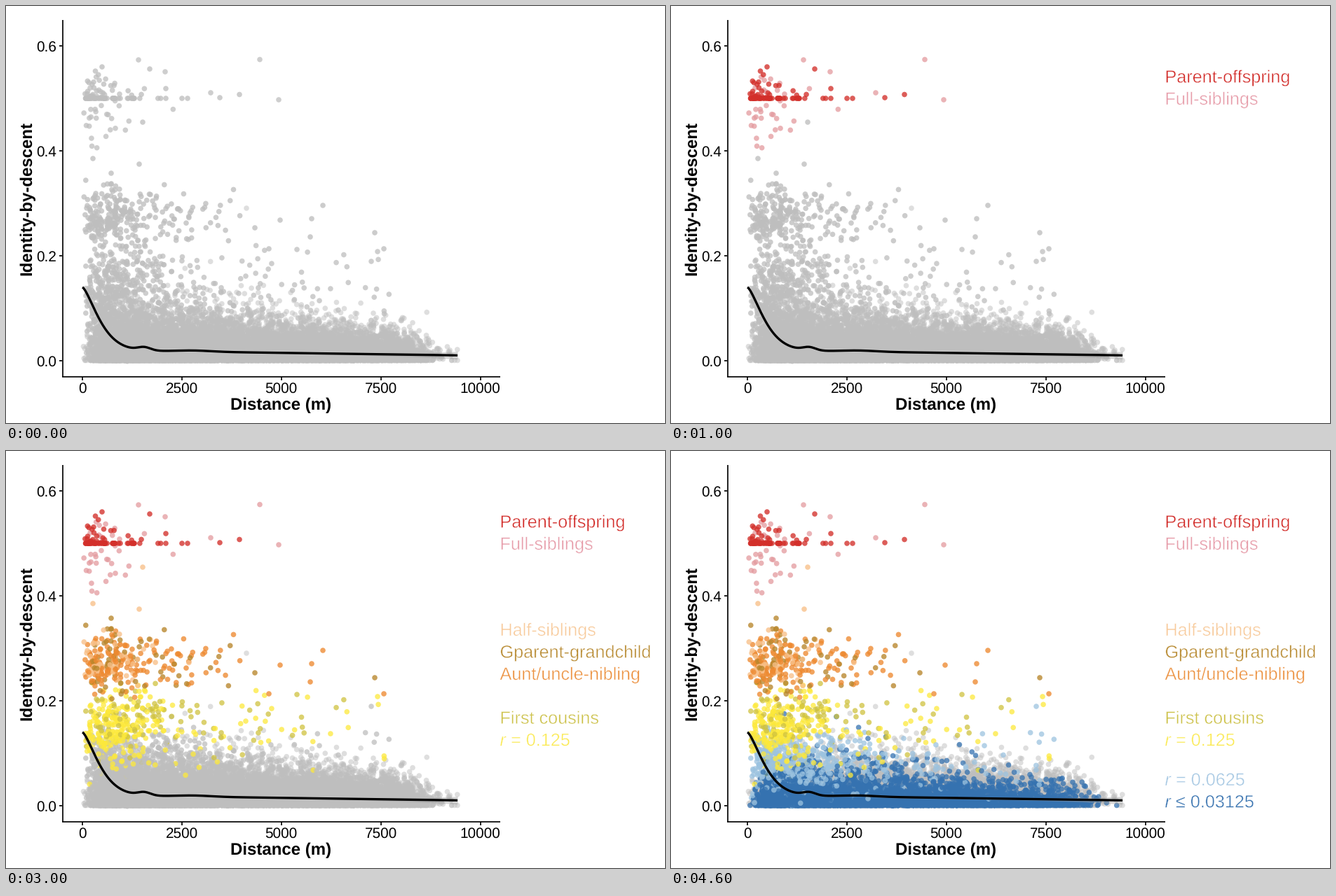
A matplotlib script that plays this animation: 940x596 px, repeating every 5 s.

```python
import numpy as np
import matplotlib.pyplot as plt
from matplotlib.animation import FuncAnimation
from matplotlib.colors import to_rgba
from matplotlib.patheffects import Stroke

W, H, DPI = 940, 596, 64
PT = 72 / DPI
LEFT, RIGHT = 109, 644    # pixel range of the data
BASE = 506.5              # pixel row of y = 0.0
DOT = 7.6
GREY = "#bebebe"

plt.rcParams["font.family"] = "Liberation Sans"
plt.rcParams["text.hinting"] = "none"
rng = np.random.default_rng(12)

fig = plt.figure(figsize=(W / DPI, H / DPI), dpi=DPI, facecolor="white")
ax = fig.add_axes([0, 0, 1, 1])
ax.set(xlim=(0, W), ylim=(H, 0))
ax.axis("off")


def decay(n, fade, height, zero):
    """Points piled on the baseline, thinning out upwards and to the right."""
    grid = np.linspace(LEFT, RIGHT, 2000)
    weight = (np.exp(-(grid - LEFT) / fade)
              / (1 + np.exp((130 - grid) / 4.5))
              / (1 + np.exp((grid - 578) / 14)))
    cdf = np.cumsum(weight)
    x = np.interp(rng.random(n), cdf / cdf[-1], grid)
    scale = height * (1 - 0.5 * ((x - LEFT) / (RIGHT - LEFT)) ** 2)
    h = rng.gamma(1.5, scale)
    h[rng.random(n) < zero] = 0
    return np.column_stack([x, BASE - h])


def cloud(n, spread, y, sd, far=0, reach=0, shape=1.8):
    """Skewed in x, bell-shaped in y, plus `far` points out to `reach`."""
    x = 110 + rng.gamma(shape, spread, n)
    x = np.append(x, rng.uniform(220, max(reach, 221), far))
    bell = rng.uniform(-1, 1, (3, len(x))).sum(axis=0)
    return np.column_stack([x, y + sd * bell])


def half_line(n, spread, lift):
    """Points on the 0.5 line, lifted by a random amount."""
    return np.column_stack([112 + rng.exponential(spread, n),
                            132 - rng.exponential(lift, n)])


# points, lone points, colour, alpha, step that reveals it, stacking rank
GROUPS = [
    (decay(8800, 2000, 15.5, .1), [(640, BASE), (644, BASE), (343, 289)],
     GREY, .5, 9, -1),
    (decay(3700, 330, 13.5, .2), [], "#3572b0", .75, 4, 1),
    (cloud(480, 52, 449, 22, 35, 540), [(521, 365)], "#9cc3e0", .75, 4, 1.2),
    (cloud(90, 46, 388, 25, 14, 500), [(415, 348)], "#cfc23f", .75, 3, 1.7),
    (cloud(240, 32, 399, 29, 22, 550), [(530, 351)], "#fde93b", .75, 3, 1.7),
    (cloud(58, 22, 303, 18), [(124, 218), (190, 226), (195, 166)],
     "#f8c088", .78, 2, 2.4),
    (cloud(52, 30, 303, 23, 9, 350), [(526, 324), (355, 317), (150, 239)],
     "#b8862b", .78, 2, 2.4),
    (cloud(140, 29, 308, 20, 22, 350), [(452, 285), (436, 304), (434, 330),
                                       (391, 306), (375, 347), (539, 347)],
     "#ee8a31", .78, 2, 2.4),
    (cloud(36, 18, 139, 29, shape=1.5), [(362, 76.5), (389, 134), (292, 124),
                                        (189, 77), (227, 94)],
     "#e39a9e", .75, 1, 4),
    (np.vstack([half_line(50, 30, .01), half_line(26, 22, 8)]),
     [(205, 90), (137, 87), (228, 118), (228, 132), (251, 132), (259, 132),
      (305, 131), (333, 126.5)], "#d32f2a", .78, 1, 6),
]

xy, color, grey, reveal, depth = [], [], [], [], []
for pts, lone, c, alpha, step, rank in GROUPS:
    pts = np.vstack([pts, np.reshape(lone, (-1, 2))])
    n = len(pts)
    xy.append(pts)
    color.append(np.tile(to_rgba(c, alpha), (n, 1)))
    grey.append(np.tile(to_rgba(GREY, alpha), (n, 1)))
    reveal.append(np.full(n, step))
    depth.append(rank + 1.2 * rng.random(n))
order = np.argsort(np.concatenate(depth))
xy, color, grey, reveal = (np.concatenate(a)[order]
                           for a in (xy, color, grey, reveal))

dots = ax.scatter(xy[:, 0], xy[:, 1], s=(DOT * PT) ** 2, c=grey,
                  linewidths=0, zorder=2)


def bump(x, mid, width):
    return np.exp(-((x - mid) / width) ** 2)


# smoothed trend: steep drop, two small waves, then a slow fall
tx = np.linspace(LEFT, RIGHT, 600)
ty = (493 + 0.0142 * (tx - 200)
      - 89.7 * np.exp(-((tx - LEFT) / 31) ** 1.43)
      - 4.7 * bump(tx, 197, 13) - 1.6 * bump(tx, 268, 35))
band = 1.4 + 4.2 * ((tx - LEFT) / (RIGHT - LEFT)) ** 8
ax.fill_between(tx, ty - band, ty + band, color="#999999", alpha=.4,
                linewidth=0, zorder=3)
ax.plot(tx, ty, color="black", lw=3.3 * PT, solid_capstyle="butt", zorder=4)


def line(xs, ys):
    ax.plot(xs, ys, color="black", lw=1.7 * PT, solid_capstyle="butt",
            zorder=1)


def label(x, y, s, size, **kw):
    return ax.text(x, y, s, fontsize=size * PT, va="baseline", **kw)


line([80.5, 80.5], [19.5, 530.3])
line([79.7, 705], [529.5, 529.5])
for k in range(4):
    y = BASE - 149.67 * k
    line([76, 80], [y, y])
    label(71.7, y + 7.8, f"{0.2 * k:.1f}", 20.8, ha="right")
for k in range(5):
    x = 108.7 + 142 * k
    line([x, x], [530, 534.5])
    label(x, 553, str(2500 * k), 20.8, ha="center")
label(392.5, 577, "Distance (m)", 24, ha="center", weight="bold")
label(36.3, 274.5, "Identity-by-descent", 24, ha="center", weight="bold",
      rotation=90, rotation_mode="anchor")

# step, baseline, text, colour
LEGEND = [
    (1, 109.5, "Parent-offspring", "#d22b28"),
    (1, 141, "Full-siblings", "#e79daa"),
    (2, 264, "Half-siblings", "#f8cb9c"),
    (2, 295.5, "Gparent-grandchild", "#b98c34"),
    (2, 327, "Aunt/uncle-nibling", "#ec913f"),
    (3, 389.8, "First cousins", "#cdc24a"),
    (3, 421.3, "= 0.125", "#fbea52"),
    (4, 478, "= 0.0625", "#a6c8e3"),
    (4, 509.5, "≤ 0.03125", "#3873b0"),
]
legend = []
for step, y, s, c in LEGEND:
    # a white outline slims the letters to a light weight
    kw = dict(color=c, path_effects=[Stroke(linewidth=.5 * PT,
                                            foreground="white")])
    x = 704.5
    if s[0] in "=≤":
        legend.append((step, label(x, y, "r", 25.2, style="italic", **kw)))
        x = 720
    legend.append((step, label(x, y, s, 25.2, **kw)))


def update(step):
    dots.set_facecolors(np.where((reveal <= step)[:, None], color, grey))
    for first, text in legend:
        text.set_visible(step >= first)
    return [dots]


anim = FuncAnimation(fig, update, frames=5, interval=1000,
                     init_func=lambda: update(0), repeat=True,
                     repeat_delay=0, blit=False)
plt.show()
```
